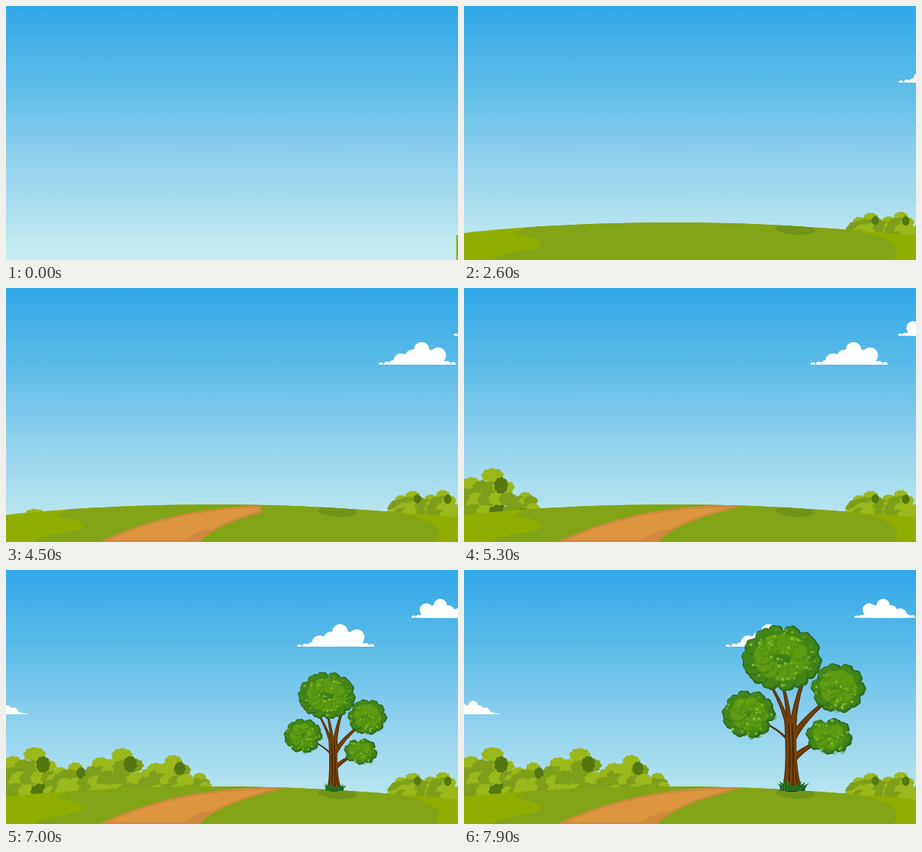
Write an HTML page with a canvas that moves like this. It is 600x338 px and loops after 8000 ms.

```html
<!DOCTYPE html>
<html lang="en">
<head>
<meta charset="utf-8">
<title>Landscape</title>
<style>
  html, body { margin: 0; width: 100%; height: 100%; overflow: hidden; }
  canvas { display: block; width: 100vw; height: 100vh; }
</style>
</head>
<body>
<canvas></canvas>
<script>
const W = 600, H = 338, LOOP = 8000, TAU = Math.PI * 2;
const canvas = document.querySelector('canvas');
const ctx = canvas.getContext('2d');
const dpr = window.devicePixelRatio || 1;
canvas.width = W * dpr;
canvas.height = H * dpr;

const clamp = v => Math.max(0, Math.min(1, v));
const span = (t, start, length) => clamp((t - start) / length);
const easeOut = p => 1 - (1 - p) ** 2;

function seeded(seed) {
  return () => (seed = (seed * 16807) % 2147483647) / 2147483647;
}

function gradient(x, y, stops) {
  const g = ctx.createLinearGradient(0, 0, x, y);
  stops.forEach(([at, color]) => g.addColorStop(at, color));
  return g;
}

function fill(path, color) {
  ctx.fillStyle = color;
  ctx.fill(path);
}

function disc(x, y, r) {
  ctx.beginPath();
  ctx.arc(x, y, r, 0, TAU);
  ctx.fill();
}

// Ellipse with a scalloped, leafy rim
function blob(x, y, rx, ry, color, lobes = 9) {
  const at = (a, k) => [x + Math.cos(a) * rx * k, y + Math.sin(a) * ry * k];
  const turn = x * 1.7 + y;
  ctx.beginPath();
  ctx.moveTo(...at(turn, .9));
  for (let i = 1; i <= lobes; i++) {
    const a = turn + i / lobes * TAU;
    ctx.quadraticCurveTo(...at(a - Math.PI / lobes, 1.2), ...at(a, .9));
  }
  ctx.fillStyle = color;
  ctx.fill();
}

function clipped(path, paint) {
  ctx.save();
  ctx.clip(path);
  paint();
  ctx.restore();
}

function rect(x, y, w, h) {
  const p = new Path2D();
  p.rect(x, y, w, h);
  return p;
}

// Sky and clouds
const SKY = gradient(0, H, [[0, '#31a8e8'], [.3, '#5bbbe8'], [.6, '#90d1ed'], [1, '#caedf1']]);
const DOMES = [[31, 15], [46, 20], [58, 30], [69, 20], [80, 23]];

// x is the tall-side edge at time "at"; a negative size mirrors the cloud
const CLOUDS = [
  { x: 576, at: 2600, speed: -.0433, y: 102, size: 1, flip: 1 },
  { x: 681, at: 4500, speed: -.0223, y: 63.5, size: .84, flip: -1 },
  { x: 12, at: 6200, speed: .0206, y: 192, size: .6, flip: -1 }
];

function drawCloud({ x, at, speed, y, size, flip }, t) {
  ctx.save();
  ctx.translate(x + speed * (t - at), y);
  ctx.scale(size * flip, size);
  clipped(rect(-5, -40, 120, 40), () => {
    ctx.fillStyle = '#fff';
    DOMES.forEach(([dx, height]) => disc(dx, 10.5 - height, 10.5));
    for (let dx = 4; dx < 108; dx += 8) {
      disc(dx, 0, 3 + 9 * Math.sin(Math.PI * dx / 108) ** 2);
    }
  });
  ctx.restore();
}

// Ground
const MEADOW = '#83a416';
const GROUND = gradient(W, 0, [[0, '#90ae00'], [.2, '#90ae00'], [.475, MEADOW], [.9, '#90ae00'], [1, '#91ae00']]);
const HILL = new Path2D('M0 302C80 293 180 288 285 288C400 288 500 297 600 305V338H0Z');
const PATCH = new Path2D('M100 285L66 303C80 306 102 309 102 318C100 327 54 324 37 338H570C582 322 575 306 508 298L490 280Z');
const ROAD = new Path2D('M124 338C190 306 270 288 368 289.5C340 299 280 311 257 338Z');

function drawGround(t) {
  const s = t / 1000;
  const edge = Math.max(0, 598 - 293 * s - 20 * s * s);
  clipped(rect(edge, 0, W, H), () => {
    fill(HILL, GROUND);
    clipped(HILL, () => {
      ctx.globalAlpha = span(t, 1050, 700);
      fill(PATCH, MEADOW);
      ctx.globalAlpha = span(t, 1900, 400);
      ctx.fillStyle = '#6f9417';
      ctx.beginPath();
      ctx.ellipse(440, 297.5, 26, 7, .06, 0, TAU);
      ctx.fill();
    });
  });
}

function drawRoad(t) {
  const reach = Math.max(0, 338 + (t - 4500) * .25);
  clipped(rect(0, 280, Math.min(reach, 370), 60), () => {
    fill(ROAD, '#dc943f');
    clipped(ROAD, () => {
      ctx.strokeStyle = '#d0883f';
      ctx.lineWidth = 5;
      ctx.stroke(ROAD);
      ctx.fillStyle = '#d0883f';
      ctx.beginPath();
      ctx.ellipse(252, 334, 24, 7, -.5, 0, TAU);
      ctx.fill();
    });
  });
}

// Bushes: a mound is rows of leaf blobs that widen towards the base
const LIGHT = '#9ab81c', MID = '#7f9f1b', DARK = '#55770f';
const RISE = 62, RISE_TIME = 920;

function mound(x, base, h, rand) {
  const size = 5 + h * .13, rows = 4, parts = [];
  for (let row = 0; row < rows; row++) {
    const v = row / (rows - 1);
    const half = h * .4 * Math.sqrt(v);
    const count = Math.ceil(2 * half / (1.4 * size)) + 1;
    for (let i = 0; i < count; i++) {
      const u = count > 1 ? i / (count - 1) * 2 - 1 : 0;
      const pick = rand();
      const color = row === 0 || pick < .4 ? LIGHT : row === rows - 1 && pick > .85 ? DARK : MID;
      parts.push([x + u * half, base - h + size * .75 + v * (h - size) + rand() * 3,
        size * (.9 + rand() * .25), size * .75, color]);
    }
  }
  return parts;
}

function bush(start, x, base, h) {
  const rand = seeded(x * 37 + 11);
  return { start, parts: [
    ...mound(x - h * .46, base, h * .8, rand),
    ...mound(x + h * .7, base, h * .5, rand),
    ...mound(x, base, h, rand),
    [x + h * .18, base - h * .6, h * .15, h * .18, DARK]
  ] };
}

const BUSHES = [
  bush(1755, 540, 301, 34), bush(1755, 580, 302, 35),
  bush(4440, 38, 296, 62), bush(4950, 92, 296, 43),
  bush(5500, 154, 295, 61), bush(5910, 222, 294, 50)
];

function drawBush({ start, parts }, t) {
  if (t < start) return;
  ctx.save();
  ctx.translate(0, RISE * (1 - span(t, start, RISE_TIME)));
  parts.forEach(p => blob(...p));
  ctx.restore();
}

// Tree
const ROOT = { x: 436, y: 293 };
const TRUNK = new Path2D('M423 292C429 270 428 235 426 196L441 196C439 235 441 272 448 292C440 295 430 295 423 292Z');
const BARK = new Path2D('M431 288C434 260 433 235 431 206M437 289C437 262 437 235 436 204M443 286C439 265 438 250 438 232');
// Tip x, tip y, height where the branch leaves the trunk
const BRANCHES = [[408, 154, 214], [424, 156, 208], [449, 150, 208],
  [486, 170, 222], [390, 198, 226], [478, 224, 250]];
// Centre and radii
const CROWNS = [[497, 157, 36, 33], [378, 192, 35, 32], [485, 221, 31, 24], [422, 117, 53, 44]].map(makeCrown);

// Rings of lobes inside an ellipse, plus small scattered leaves
function makeCrown([x, y, rx, ry], index) {
  const rand = seeded(731 + index * 977);
  const size = 5 + (rx + ry) * .085;
  const ring = (k, count) => Array.from({ length: count }, (_, i) => {
    const a = (i + rand() * .4) / count * TAU, r = size * (.85 + rand() * .3);
    return [x + Math.cos(a) * (rx - r) * k, y + Math.sin(a) * (ry - r) * k, r];
  });
  const leaves = Array.from({ length: Math.round(rx * ry / 38) }, () => {
    const a = rand() * TAU, d = .88 * Math.sqrt(rand());
    return [x + Math.cos(a) * rx * d, y + Math.sin(a) * ry * d, .9 + rand() * 1.3];
  });
  const around = Math.round((rx + ry) / 7);
  return { body: [x, y, rx * .8, ry * .8], rim: ring(1, around), core: ring(.62, around - 2), leaves };
}

function drawCrown({ body, rim, core, leaves }) {
  const lobe = ([x, y, r], grow, color) => blob(x, y, r + grow, r + grow, color, 7);
  rim.forEach(p => lobe(p, 1, '#28601a'));
  blob(...body, '#3c7f19');
  rim.forEach(p => {
    lobe(p, -.3, '#34731a');
    lobe([p[0] - 1, p[1] - 1, p[2]], -1.2, '#428519');
  });
  core.forEach(([x, y, r]) => {
    lobe([x, y, r], 0, '#4b8c16');
    lobe([x - 1, y - 1.5, r], -1, '#5c9a10');
  });
  leaves.forEach(([x, y, r], i) => {
    ctx.strokeStyle = '#3f8118';
    ctx.lineWidth = .8;
    ctx.beginPath();
    ctx.arc(x + 3, y + 2, 3.5, .1, 2.4);
    ctx.stroke();
    ctx.fillStyle = i % 2 ? '#87bd2b' : '#6da81c';
    disc(x, y, r);
  });
}

function branchPath([x, y, from]) {
  const side = Math.sign(x - 434) * 2;
  const cx = 434 + (x - 434) * .32, cy = from + (y - from) * .5;
  return new Path2D(`M${431 + side} ${from}Q${cx - 2} ${cy} ${x - 1} ${y}L${x + 1} ${y + 1}Q${cx + 2.5} ${cy + 2} ${437 + side} ${from + 5}Z`);
}

const WOOD = [...BRANCHES.map(branchPath), TRUNK];

function drawGrass() {
  for (let i = -8; i <= 8; i++) {
    const x = ROOT.x + i * 1.7, tip = ROOT.x + 1 + i * 2.7;
    const top = Math.abs(i) < 3 ? 286 : 278 + Math.abs(i) * .7 + i % 2 * 3;
    ctx.beginPath();
    ctx.moveTo(x - 3, 294);
    ctx.quadraticCurveTo(x - 2, 287, tip, top);
    ctx.quadraticCurveTo(x + 3, 288, x + 3, 294);
    ctx.fillStyle = i % 2 ? '#2f7d24' : '#1c5f20';
    ctx.fill();
  }
}

function drawTree(t) {
  const size = easeOut(span(t, 6170, 1780));
  if (!size) return;
  ctx.save();
  ctx.translate(ROOT.x, ROOT.y);
  ctx.scale(size, size);
  ctx.translate(-ROOT.x, -ROOT.y);
  ctx.lineJoin = 'round';
  const line = (path, width, color) => {
    ctx.lineWidth = width;
    ctx.strokeStyle = color;
    ctx.stroke(path);
  };
  WOOD.forEach(p => line(p, 2, '#452604'));
  WOOD.forEach(p => fill(p, '#703f08'));
  line(BARK, 1.6, '#452604');
  ctx.translate(2, 0);
  line(BARK, .7, '#8d5716');
  ctx.translate(-2, 0);
  CROWNS.forEach(drawCrown);
  drawGrass();
  ctx.restore();
}

function draw(t) {
  ctx.setTransform(dpr, 0, 0, dpr, 0, 0);
  ctx.fillStyle = SKY;
  ctx.fillRect(0, 0, W, H);
  CLOUDS.forEach(c => drawCloud(c, t));
  BUSHES.forEach(b => drawBush(b, t));
  drawGround(t);
  drawRoad(t);
  drawTree(t);
}

const begin = performance.now();
function tick() {
  draw((performance.now() - begin) % LOOP);
  requestAnimationFrame(tick);
}
tick();
</script>
</body>
</html>
```
